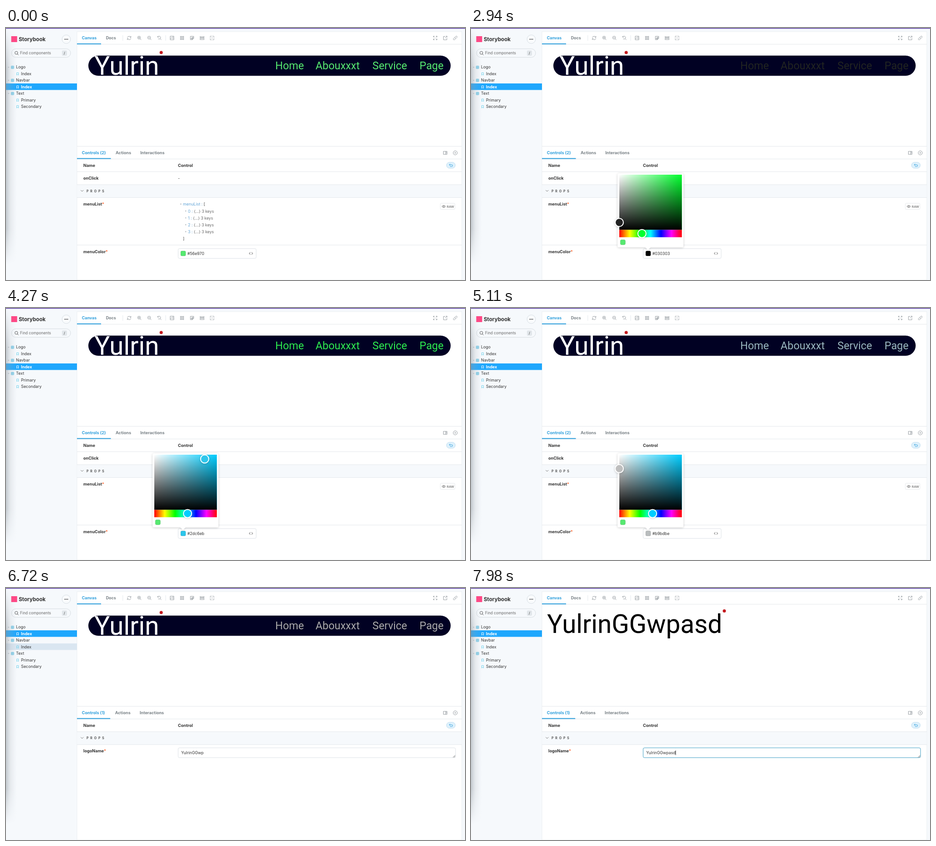
Recreate the animation shown at these times as an HTML page. Size 1009 by 555 pixels, loop 8000 ms.

```html
<!DOCTYPE html>
<html lang="en">
<head>
<meta charset="utf-8">
<title>Component explorer</title>
<style>
  html, body { margin: 0; width: 100%; height: 100%; overflow: hidden; background: #f6f9fc; }
  svg { display: block; width: 1009px; height: 555px; font: 8.85px Inter, "Noto Sans", sans-serif; }
  text { white-space: pre; fill: #333; }
  .b { font-weight: 700; font-size: 9.1px; }
  .tab { font-weight: 700; font-size: 9.1px; fill: #798186; }
  .on { fill: #2f9fdc; }
  .brand { font-family: Roboto, Inter, sans-serif; }
  .icon { fill: none; stroke: #8d9499; stroke-width: .9; }
  .line { stroke: #e4e8ec; stroke-width: 1; }
</style>
</head>
<body>
<svg viewBox="0 0 1009 555">
  <defs>
    <linearGradient id="edge"><stop stop-color="#8b949c" stop-opacity=".48"/><stop offset=".4" stop-color="#a4acb4" stop-opacity=".2"/><stop offset="1" stop-color="#c0c8d0" stop-opacity="0"/></linearGradient>
    <linearGradient id="fade" x2="0" y2="1"><stop stop-color="#000"/><stop offset=".17" stop-color="#fff"/><stop offset=".85" stop-color="#fff"/><stop offset="1" stop-color="#000"/></linearGradient>
    <mask id="soft"><rect width="24" height="520" fill="url(#fade)"/></mask>
    <linearGradient id="white"><stop stop-color="#fff"/><stop offset="1" stop-color="#fff" stop-opacity="0"/></linearGradient>
    <linearGradient id="black" x2="0" y2="1"><stop stop-opacity="0"/><stop offset="1"/></linearGradient>
    <linearGradient id="hues"></linearGradient>
    <filter id="shadow" x="-20%" y="-20%" width="140%" height="140%"><feDropShadow dx="0" dy="1" stdDeviation="2.5" flood-opacity=".2"/></filter>
  </defs>
  <g id="frame"></g>
  <g id="live"></g>
</svg>
<script>
const LOOP = 8000, STEP = 70;
const START_HUE = 130.6, END_HUE = 191.7;
const NAME = 'Yulrin', PRESET = '#56e970';
const OPEN = 1960, CLOSE = 5460, RECOLOR = 4270, SELECT = 6650, SWITCH = 6790, FOCUS = 7700;
const $ = id => document.getElementById(id);

// Pointer path in the colour field: time, saturation, value
const drag = [
  [2380, .6309, .9137], [2870, 0, .0118], [2940, 0, .13], [3360, .8085, .9216],
  [4760, .8085, .9216], [4970, .19, .745], [5040, .026, .745], [5110, 0, .745], [5180, 0, .667]
];

function pointer(t) {
  const i = drag.findIndex(k => k[0] > t);
  if (i === 0) return drag[0].slice(1);
  if (i < 0) return drag[drag.length - 1].slice(1);
  const a = drag[i - 1], b = drag[i], u = (t - a[0]) / (b[0] - a[0]);
  return [1, 2].map(n => a[n] + (b[n] - a[n]) * u);
}

const hueAt = t => t < RECOLOR ? START_HUE : END_HUE;

function hex(h, s, v) {
  return '#' + [5, 3, 1].map(n => {
    const k = (n + h / 60) % 6;
    const c = v * (1 - s * Math.max(0, Math.min(k, 4 - k, 1)));
    return Math.round(c * 255).toString(16).padStart(2, '0');
  }).join('');
}

const text = (x, y, s, cls = '', attr = '') => `<text x="${x}" y="${y}" class="${cls}" ${attr}>${s}</text>`;
const box = (x, y, w, h, fill, attr = '') => `<rect x="${x}" y="${y}" width="${w}" height="${h}" fill="${fill}" ${attr}/>`;
const disc = (x, y, r, fill, attr = '') => `<circle cx="${x}" cy="${y}" r="${r}" fill="${fill}" ${attr}/>`;
const icon = (x, y, d, attr = '') => `<path class="icon" transform="translate(${x} ${y})" d="${d}" ${attr}/>`;
const rule = y => `<path class="line" d="M156 ${y}H1002"/>`;
const stroke = c => `style="stroke:${c}"`;

const lens = 'M2.9 -.8a3.2 3.2 0 1 1-6.4 0a3.2 3.2 0 1 1 6.4 0M2 1.6L4.5 4.2';
const shapes = {
  reload: 'M-3.8 -.6A3.8 3.8 0 0 1 3.3 -1.8M3.8 .6A3.8 3.8 0 0 1 -3.3 1.8M4 -4V-1.4H1.5M-4 4V1.4H-1.5',
  zoomIn: lens + 'M-2 -.8H1.4M-.3 -2.5V.9',
  zoomOut: lens + 'M-2 -.8H1.4',
  zoomReset: 'M-3.2 -2.4A3.2 3.2 0 1 1 -2.6 1.5M-3.7 -4.3V-1.8H-1.2M2 1.6L4.5 4.2',
  image: 'M-4 -4H4V4H-4ZM-4 2.2L-1 -.6L1.3 1.8L2.5 .7L4 2.2M1.3 -2.2h1v1h-1Z',
  grid: 'M-3.6 -3.6h2.7v2.7h-2.7ZM.9 -3.6h2.7v2.7h-2.7ZM-3.6 .9h2.7v2.7h-2.7ZM.9 .9h2.7v2.7h-2.7Z',
  screens: 'M-3.7 -3.7H3.7V1.3H-3.7ZM-3.7 1.3V3.8H-.5V-1.2H3.7M1.5 -1V3.7H-.5',
  ruler: 'M-4.3 -3.5V-.7H4.3V-3.5M-4.3 -2.8H4.3M-4.3 .8H4.3V3.6H-4.3Z',
  outline: 'M-4 -2V-4H-2M2 -4H4V-2M4 2V4H2M-2 4H-4V2M-.9 -4H.9M-.9 4H.9M-4 -.9V.9M4 -.9V.9M-1.2 0H1.2',
  expand: 'M-4 -1.7V-4H-1.7M1.7 -4H4V-1.7M4 1.7V4H1.7M-1.7 4H-4V1.7M-4 -4L-1.2 -1.2M4 -4L1.2 -1.2M-4 4L-1.2 1.2M4 4L1.2 1.2',
  share: 'M0 -3.4H-3.8V4H3.6V.2M1.4 -4H4V-1.4M4 -4L-.4 .4',
  link: 'M-.6 -1.8L1.2 -3.6A1.7 1.7 0 0 1 3.7 -1.2L1.8 .7A1.7 1.7 0 0 1 -.6 .7M.6 1.8L-1.2 3.6A1.7 1.7 0 0 1 -3.7 1.2L-1.8 -.7A1.7 1.7 0 0 1 .6 -.7',
  side: 'M-4 -3.3H4V3.3H-4ZM1.1 -3.3V3.3M2 -1.4H3.2M2 .3H3.2',
  close: 'M4.5 0A4.5 4.5 0 1 1 -4.5 0A4.5 4.5 0 1 1 4.5 0M-1.7 -1.7L1.7 1.7M1.7 -1.7L-1.7 1.7',
  undo: 'M-1.6 -3.2L-3.7 -1.3L-1.6 .6M-3.7 -1.3H1.8A1.9 1.9 0 0 1 1.8 2.5H-2',
  chevron: 'M-3 -1.5L0 1.5L3 -1.5',
  code: 'M-1.2 -2.5L-3.8 0L-1.2 2.5M1.2 -2.5L3.8 0L1.2 2.5',
  eye: 'M-4.2 0Q0 -5 4.2 0Q0 5 -4.2 0ZM1.4 0A1.4 1.4 0 1 1 -1.4 0A1.4 1.4 0 1 1 1.4 0',
  component: 'M-2.7 -2.7H2.7V2.7H-2.7ZM0 -2.7V2.7M-2.7 0H2.7',
  bookmark: 'M-2 -2.7H2V2.8L0 1.1L-2 2.8Z'
};

function frame() {
  const left = ['reload', 'zoomIn', 'zoomOut', 'zoomReset'].map((n, i) => icon(270.7 + 22.1 * i, 22, shapes[n]));
  const mid = ['image', 'grid', 'screens', 'ruler', 'outline'].map((n, i) => icon(365 + 22 * i, 22, shapes[n]));
  const right = ['expand', 'share', 'link'].map((n, i) => icon(943.5 + 22 * i, 22, shapes[n]));
  return box(0, 0, 1009, 555, '#f6f9fc') +
    box(156, 8, 846, 547, '#fff', 'stroke="#e6eaee" stroke-width=".8"') +
    box(0, 0, 1009, 1.5, '#5d3fa3') +
    box(11.5, 18, 13, 13, '#ff4785') +
    text(28, 29.2, 'Storybook', 'b', 'style="font-size:11.6px"') +
    disc(132.5, 24.7, 9.4, '#f9fbfd', 'stroke="#cfd6dc" stroke-width=".8"') +
    [-3, 0, 3].map(d => disc(132.5 + d, 24.7, 1.05, '#333')).join('') +
    box(12, 45.8, 130, 18.8, '#f6f9fc', 'rx="9.4" stroke="#cfd5da" stroke-width=".8"') +
    icon(23, 55.5, lens, stroke('#444')) +
    text(31, 58.3, 'Find components', '', 'style="font-size:8.3px;fill:#666"') +
    box(123, 49.5, 11, 11.5, '#e1e6ea', 'rx="2"') +
    text(127, 58, '/', '', 'style="font-size:7.5px"') +
    text(166.7, 25.4, 'Canvas', 'tab on', 'style="font-size:8.9px"') +
    text(219.7, 25.4, 'Docs', 'tab', 'style="font-size:8.9px"') +
    '<path class="line" d="M256.8 16V28M351 16V28"/>' + rule(35.8) +
    box(156, 34, 53, 2, '#2f9fdc') +
    left.concat(mid, right).join('') +
    rule(260.5) + rule(288.5) +
    icon(965.5, 275, shapes.side) + icon(987.6, 275, shapes.close) +
    text(170, 305.8, 'Name', 'b') + text(378, 305.8, 'Control', 'b') +
    box(968.3, 295.7, 19.4, 13.2, '#def1fc', 'rx="6.6" stroke="#b9d9ec" stroke-width=".8"') +
    icon(978, 302.5, shapes.undo, stroke('#2f9fdc')) +
    rule(316.5);
}

const rows = [
  [86.3, 'Logo', true], [100.6, 'Index'], [115, 'Navbar', true], [129.5, 'Index'],
  [144, 'Text', true], [158.5, 'Primary'], [172.9, 'Secondary']
];

function hovered(t) {
  if (t >= 6090 && t < 6160) return 6;
  if (t >= 6160 && t < 6440) return 0;
  if (t >= 6440 && t < SELECT) return 1;
  return t >= SELECT && t < SWITCH ? 3 : -1;
}

function sidebar(t) {
  const active = t < SELECT ? 3 : 1, hover = hovered(t);
  return rows.map(([y, label, parent], i) => {
    const on = i === active;
    const fill = on ? '#1ea7fd' : i === hover ? '#dae6f1' : 'none';
    const tint = stroke(on ? '#fff' : parent ? '#3fb3dc' : '#6fd0ea');
    return box(0, y - 7.4, 156, 14.4, fill) + (parent
      ? `<path d="M4 ${y - .5}h3.6l-1.8 2z" fill="#b0b8be"/>` + icon(14.3, y + .3, shapes.component, tint) + text(22, y + 3.1, label)
      : icon(25.5, y + .5, shapes.bookmark, tint) +
        text(33, y + 3.1, label, on ? 'b' : '', on ? 'style="fill:#fff;font-size:9px"' : ''));
  }).join('') + box(0, 1.5, 24, 518, 'url(#edge)', 'mask="url(#soft)"');
}

function logo(x, y, s, fill) {
  return text(x, y, s, 'brand', `id="logo" style="font-size:56.5px;fill:${fill}"`) +
    disc(0, y - 48.8, 3.5, '#c41a1f', 'id="dot"');
}

function canvas(t, typed) {
  if (t >= SWITCH) return logo(167.3, 99.3, typed, '#000');
  const late = t - 2 * STEP, color = hex(hueAt(late), ...pointer(late));
  const menu = [[592, 'Home'], [680.5, 'Abouxxxt'], [805.5, 'Service'], [909, 'Page']];
  return box(181, 60.8, 796.5, 44.4, '#010123', 'rx="22.2"') +
    logo(194.5, 102.8, NAME, '#fff') +
    menu.map(([x, s]) => text(x, 91, s, 'brand', `style="font-size:23.4px;fill:${color}"`)).join('');
}

function tabs(count, shift) {
  return text(166.7, 278.2, `Controls (${count})`, 'tab on') +
    text(241 - shift, 278.2, 'Actions', 'tab') + text(295.3 - shift, 278.2, 'Interactions', 'tab') +
    box(156, 286.5, 74.5 - shift, 2, '#2f9fdc');
}

const section = y => box(156, y, 846, 28.3, '#f6f9fc') + rule(y) + rule(y + 28.4) +
  icon(167.3, y + 13.5, shapes.chevron, stroke('#666')) +
  text(177, y + 16.5, 'PROPS', 'b', 'style="font-size:7px;letter-spacing:3.8px;fill:#555"');
const label = (y, s) => text(170, y, s + '<tspan fill="#ff4400" font-weight="400">*</tspan>', 'b');

function tree() {
  const blue = s => `<tspan fill="#5fa3d6">${s}</tspan>`;
  const mark = (x, y, d) => `<path d="M${x} ${y}${d}" fill="#9aa2a8"/>`;
  return mark(382.5, 387, 'h3.6l-1.8 2z') + text(389, 391.2, blue('menuList : ') + '[') +
    [0, 1, 2, 3].map(i => {
      const y = 403.3 + 15.15 * i;
      return mark(394.5, y - 2, 'v3.4l2-1.7z') +
        text(400, y + 3.2, `${blue(i + ' : ')}{...} 3 keys`, '', 'style="fill:#666;font-size:8.7px"');
    }).join('') + text(389, 467, ']');
}

function picker(t) {
  const [s, v] = pointer(t), hue = hueAt(t), pure = hex(hue, 1, 1);
  const ring = 'stroke="#fff" stroke-width="2" filter="url(#shadow)"';
  const field = fill => box(326, 323, 137.5, 121.5, fill);
  return '<g filter="url(#shadow)">' + box(322.3, 320, 144.7, 163, '#fff', 'rx="4"') +
    '<path d="M383.5 483h11l-5.5 5.5z" fill="#fff"/></g>' +
    field(pure) + field('url(#white)') + field('url(#black)') +
    box(326, 444.5, 137.5, 16.3, 'url(#hues)') +
    disc(326 + 137.3 * hue / 360, 452.7, 9, pure, ring) +
    disc(326 + 137 * s, 444 - 121 * v, 9, hex(hue, s, v), ring) +
    (t < 2450 ? box(326.7, 464.8, 14.2, 14.2, '#c9cfd2', 'rx="4"') : '') +
    box(328.4, 466.5, 10.8, 10.8, PRESET, 'rx="2.5" stroke="#65c878" stroke-width=".8"');
}

function navbarPanel(t) {
  const color = hex(hueAt(t), ...pointer(t - STEP));
  return tabs(2, 0) + text(170, 334, 'onClick', 'b') + text(378, 334, '-') + section(345) +
    label(390.5, 'menuList') + tree() +
    box(954.8, 386, 32, 13.6, '#fff', 'rx="2" stroke="#e0e4e8" stroke-width=".8"') +
    icon(962.3, 393, shapes.eye, stroke('#777')) +
    text(969, 395.6, 'RAW', 'b', 'style="font-size:6.7px;fill:#888"') +
    rule(478) + label(496, 'menuColor') +
    box(378.4, 485.8, 171.6, 21.6, '#fff', 'rx="3" stroke="#dde2e7"') +
    box(384, 491, 11, 11, color, 'rx="2.5" stroke="#000" stroke-opacity=".15" stroke-width=".9"') +
    text(398.7, 499.8, color, '', 'style="font-size:8.8px"') +
    icon(538.5, 496.5, shapes.code, stroke('#333')) +
    (t >= OPEN && t < CLOSE ? picker(t) : '');
}

function logoPanel(t, typed) {
  const focus = t >= FOCUS;
  return tabs(1, 1.3) + section(316.5) + label(362.2, 'logoName') +
    box(378.4, 352, 609.8, 21.7, '#fff', `rx="3" stroke="${focus ? '#3f9fc4' : '#dde2e7'}"`) +
    text(385, 366.3, typed, '', 'id="field" style="font-size:8.8px"') +
    (focus ? box(0, 358, .9, 10, '#111', 'id="caret"') : '') +
    icon(985, 370.8, 'M-2.5 2.4L2.4 -2.5M0 2.4L2.4 0', stroke('#666'));
}

const typedAt = t => NAME + 'GGwp' + 'asd'.slice(0, Math.max(0, Math.floor((t - FOCUS) / STEP)));
const endOf = (id, x) => x + $(id).getComputedTextLength();

let shown = -1;
function draw(time) {
  const t = Math.floor(time / STEP) * STEP;
  if (t === shown) return;
  shown = t;
  $('live').innerHTML = sidebar(t) + canvas(t, typedAt(t - STEP)) +
    (t < SELECT ? navbarPanel(t) : logoPanel(t, typedAt(t)));
  $('dot').setAttribute('cx', endOf('logo', t < SWITCH ? 194.5 : 167.3) + 4.8);
  if ($('caret')) $('caret').setAttribute('x', endOf('field', 385));
}

$('hues').innerHTML = [0, 60, 120, 180, 240, 300, 360]
  .map(h => `<stop offset="${h / 360}" stop-color="${hex(h, 1, 1)}"/>`).join('');
$('frame').innerHTML = frame();

const begin = performance.now();
function tick() {
  draw((performance.now() - begin) % LOOP);
  requestAnimationFrame(tick);
}
tick();
</script>
</body>
</html>
```
